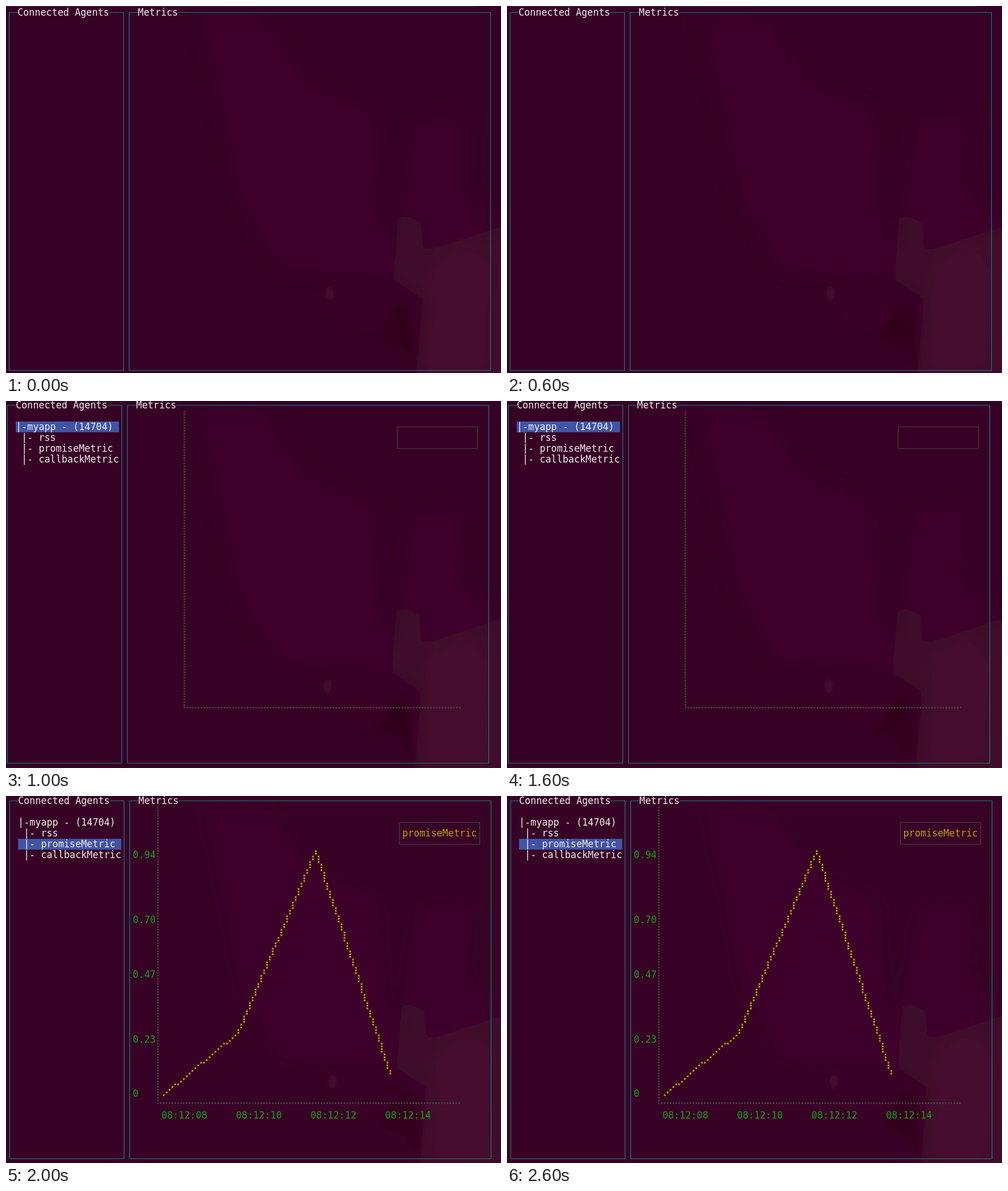
Recreate the animation shown at these times as an HTML page. Size 870 by 644 pixels, loop 3 s.

```html
<!DOCTYPE html>
<html lang="en">
<head>
<meta charset="utf-8">
<title>Agent metrics</title>
<style>
html, body { margin: 0; width: 100%; height: 100%; overflow: hidden; background: #370025; }
svg { display: block; width: 870px; height: 644px; }
text { font: 16.74px "DejaVu Sans Mono", monospace; white-space: pre; }
</style>
</head>
<body>
<svg viewBox="0 0 870 644">
  <defs>
    <filter id="soft" x="-30%" y="-30%" width="160%" height="160%"><feGaussianBlur stdDeviation="14"/></filter>
    <filter id="edge" x="-30%" y="-30%" width="160%" height="160%"><feGaussianBlur stdDeviation="5"/></filter>
  </defs>
  <rect id="base" width="870" height="644" fill="#370025"/>
  <g id="photo">
    <g filter="url(#soft)">
      <path fill="#3d0629" d="M340 20 L455 25 L540 140 L650 185 L660 370 L700 480 L480 465 L405 340 L380 200Z"/>
      <path fill="#3c0529" d="M715 200 L810 190 L805 320 L860 380 L740 440 L690 380Z"/>
      <path fill="#3e0729" d="M690 360 L730 380 L740 520 L680 480Z"/>
      <path fill="#3f092b" d="M740 430 L890 380 L890 660 L720 660Z"/>
      <path fill="#46102f" d="M750 455 L810 415 L850 460 L840 640 L735 640Z"/>
    </g>
    <g filter="url(#edge)">
      <path fill="#3b0627" d="M562 512 Q570 480 630 478 Q680 490 690 520 Q665 570 635 577 Q590 565 562 512Z"/>
      <ellipse cx="568" cy="504" rx="7" ry="13" fill="#440c2f"/>
      <path fill="#33001f" d="M692 522 L712 548 L719 634 L694 596 L650 580Z"/>
    </g>
  </g>
  <g id="view"></g>
</svg>
<script>
const CW = 10.08, RH = 19.035;
const TEAL = '#0f8085', GREY = '#443f40', GREEN = '#1a9a14', GOLD = '#bd9e08', WHITE = '#f0ecee';
const agents = [[2, '|-myapp - (14704)'], [3, '|- rss'], [3, '|- promiseMetric'], [3, '|- callbackMetric']];
const photo = document.getElementById('photo');
const base = document.getElementById('base');
const view = document.getElementById('view');

// Terminal grid whose top-left cell is centred on (ox + CW / 2, oy)
function grid(ox, oy) {
  const x = col => ox + col * CW;
  const y = row => oy + row * RH;
  const mid = col => Math.floor(x(col) + CW / 2) + .5;
  const line = row => Math.floor(y(row)) + .5;
  const text = (col, row, str, fill = WHITE) =>
    `<text x="${x(col)}" y="${y(row) + 5.6}" fill="${fill}">${str}</text>`;
  const path = (d, stroke) => `<path d="${d}" fill="none" stroke="${stroke}" stroke-width="1.2"/>`;
  const box = (c0, r0, c1, r1, stroke) =>
    path(`M${mid(c0)} ${line(r0)}H${mid(c1)}V${line(r1)}H${mid(c0)}Z`, stroke);
  const panel = (c0, c1, title) => path(
    `M${x(c0 + 2)} ${line(0)}H${mid(c0)}V${line(33)}H${mid(c1)}V${line(0)}H${x(c0 + 2 + title.length)}`, TEAL) +
    text(c0 + 2, 0, title);
  const mark = (col, row, len) =>
    `<rect x="${x(col)}" y="${y(row) - 9.5}" width="${len * CW}" height="${RH}" fill="#3f55a4"/>`;
  return { text, box, panel, mark };
}

function dots(cells, left, bottom, size, fill) {
  const d = cells.map(([k, n]) =>
    `M${(left + k * CW / 2 - size / 2).toFixed(2)} ${(bottom - n * RH / 4 - size / 2).toFixed(2)}h${size}v${size}h${-size}z`);
  return `<path d="${d.join('')}" fill="${fill}"/>`;
}

function axes(left, bottom, count) {
  const cells = [];
  for (let n = 1; n < 110; n++) cells.push([0, n]);
  for (let k = 0; k < count; k++) cells.push([k, 0]);
  return dots(cells, left, bottom, 2.8, GREY);
}

function polyline(points) {
  const cells = [];
  for (let i = 1; i < points.length; i++) {
    const [x0, y0] = points[i - 1], [x1, y1] = points[i];
    const steps = Math.max(Math.abs(x1 - x0), Math.abs(y1 - y0));
    for (let s = i > 1 ? 1 : 0; s <= steps; s++)
      cells.push([Math.round(x0 + (x1 - x0) * s / steps), Math.round(y0 + (y1 - y0) * s / steps)]);
  }
  return cells;
}

const panels = g => g.panel(0, 20, 'Connected Agents') + g.panel(21, 84, 'Metrics');
const list = (g, active) => g.mark(2, 2 + active, 18) +
  agents.map(([col, str], i) => g.text(col, 2 + i, str)).join('');

function empty() {
  return '<path d="M0 .5H828" stroke="#56434f" stroke-opacity=".7"/>' + panels(grid(0, 11.2));
}

function idle() {
  const g = grid(-3, 7.3);
  return panels(g) + list(g, 0) + axes(313.5, 538, 97) + g.box(68, 2, 82, 4, GREY);
}

function chart() {
  const g = grid(1, 8.4);
  const ticks = [['0.94', 5], ['0.70', 11], ['0.47', 16], ['0.23', 22], ['0', 27]];
  const curve = polyline([[0, 0], [26, 23], [53, 90], [79, 8]]);
  let out = panels(g) + list(g, 2) + axes(267, 539, 106) + g.box(68, 2, 82, 4, GREY);
  out += g.text(69, 3, 'promiseMetric', GOLD);
  for (const [str, row] of ticks) out += g.text(22, row, str, GREEN);
  for (let i = 0; i < 4; i++) out += g.text(27 + 13 * i, 29, '08:12:' + String(8 + 2 * i).padStart(2, '0'), GREEN);
  return out + dots(curve, 277.3, 525, 3, GOLD);
}

const scenes = [
  { html: empty(), shift: '0 0', back: '#370025' },
  { html: idle(), shift: '-3 -4', back: '#370025' },
  { html: chart(), shift: '6 -3', back: '#380226' }
];
let shown = -1;

function draw(ms) {
  const i = Math.floor(ms % 3000 / 1000);
  if (i === shown) return;
  shown = i;
  view.innerHTML = scenes[i].html;
  photo.setAttribute('transform', `translate(${scenes[i].shift})`);
  base.setAttribute('fill', scenes[i].back);
}

const start = performance.now();
function tick() {
  draw(performance.now() - start);
  requestAnimationFrame(tick);
}
tick();
</script>
</body>
</html>
```
